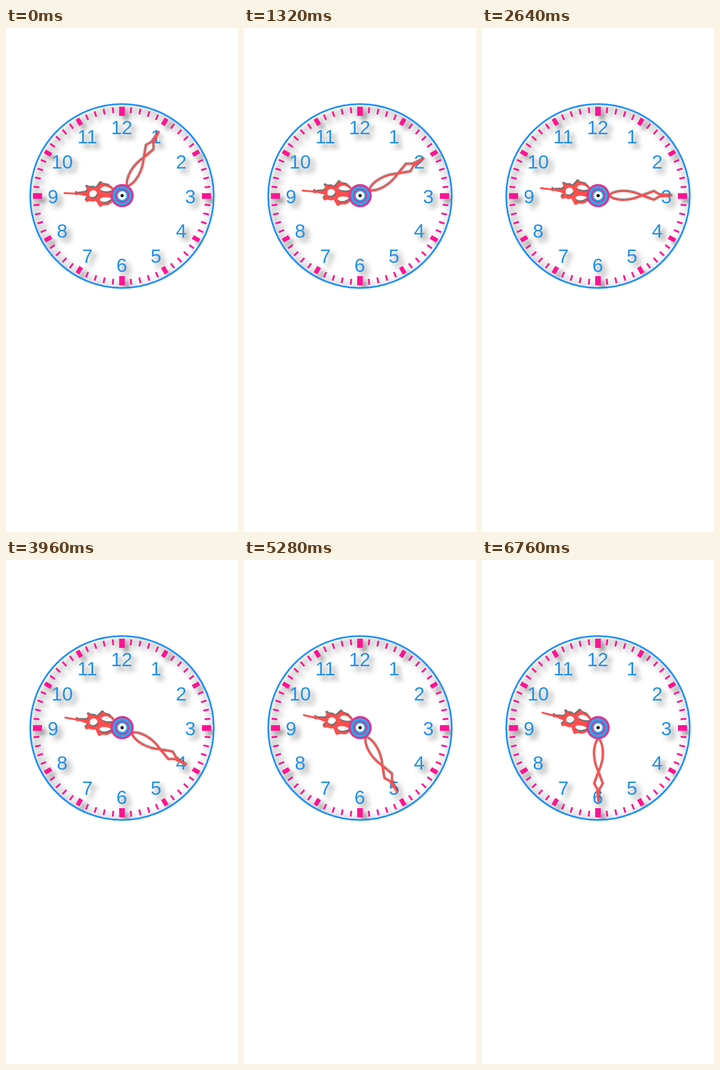
Animation of 508x1101 px, one loop 8.08 s. Source, as an HTML page:

```html
<!DOCTYPE html>
<html lang="en">
<head>
<meta charset="utf-8">
<title>Clock</title>
<style>
  html, body { margin: 0; width: 100%; height: 100%; overflow: hidden; background: #fff; }
  svg { display: block; width: 508px; height: 1101px; }
  text { font: 42px "Liberation Sans", Arial, sans-serif; fill: #2191ea; text-anchor: middle; }
  .tick { stroke: #ff1493; }
  .rim { fill: none; stroke: #1e90ff; stroke-width: 3.6; }
  .dial { filter: drop-shadow(9px 9px 6px rgba(0, 0, 0, .48)); }
  .hour { fill: #ff4d4d; fill-rule: evenodd; }
  .raised { filter: drop-shadow(-2px -2.5px .7px rgba(50, 50, 50, .7)); }
  .minute { fill: none; stroke: #ff4d4d; stroke-width: 4.1; stroke-linejoin: round;
            filter: drop-shadow(0 -1.6px .7px rgba(60, 60, 60, .5)); }
</style>
</head>
<body>
<svg viewBox="0 0 508 1101">
  <clipPath id="face"><circle r="202"/></clipPath>
  <g transform="translate(254 367)">
    <g clip-path="url(#face)">
      <g class="dial" id="dial"><circle class="rim" r="201"/></g>
    </g>
    <circle class="rim" r="201"/>
  </g>
  <g transform="translate(254.3 366.2)">
    <g id="hour">
      <path class="hour raised" id="body"/>
      <path class="hour" d="M-128 -2L-104 -2L-100 -3.5L-95 -2L-76 -4.5V4.5L-95 2L-100 3.5L-104 2L-128 2Z"/>
    </g>
    <g id="minute">
      <path class="minute" d="M23 0C36 -12 68 -14 96 0L122 9.5L134 2.5L161 0L134 -2.5L122 -9.5L96 0C68 14 36 12 23 0"/>
    </g>
    <g id="hub"></g>
  </g>
</svg>
<script>
const $ = id => document.getElementById(id);

function add(parent, tag, attrs, text = '') {
  const node = document.createElementNS('http://www.w3.org/2000/svg', tag);
  for (const key in attrs) node.setAttribute(key, attrs[key]);
  node.textContent = text;
  parent.append(node);
}

for (let i = 0; i < 60; i++) {
  const [inner, outer, width] = i % 15 === 0 ? [175, 195, 12.5] : i % 5 === 0 ? [179, 195, 9.5] : [182, 194.5, 4];
  add($('dial'), 'line', {
    class: 'tick', y1: -inner, y2: -outer, 'stroke-width': width, transform: `rotate(${i * 6})`
  });
}

for (let n = 1; n <= 12; n++) {
  const angle = n * Math.PI / 6;
  add($('dial'), 'text', { x: -.7 + 150.5 * Math.sin(angle), y: 15.5 - 150.5 * Math.cos(angle) }, n);
}

const rings = [[25.4, '#dd368f'], [20.5, '#10b2f8'], [15.8, '#dd368f'], [12.2, '#10b2f8'], [9.4, '#fff'], [3.4, '#000']];
for (const [r, fill] of rings) add($('hub'), 'circle', { r, fill });

// The hour hand's body is one half outline, mirrored; it points to nine at rest.
const edge = [[-102, -1], [-100, -3], [-96, -1], [-79, -4], [-76, -8], [-80, -15], [-77, -17.5],
  [-71, -15], [-63, -16], [-57, -14], [-52, -21], [-49, -26], [-45, -26.5], [-41, -23], [-30, -22], [-20, -15], [-12, -4]];
const mirror = points => points.map(([x, y]) => [x, -y]);
const outline = points => `M${points.join('L')}Z`;
const lens = side => `M-49 ${side * 11}C-43 ${side * 23} -29 ${side * 19} -20 ${side * 9}` +
  `C-28 ${side * 3} -46 ${side * 4} -49 ${side * 11}Z`;
const eye = 'M-72 0C-72 -6 -68 -9 -63 -9C-58 -9 -55 -5 -53 0C-55 5 -58 9 -63 9C-68 9 -72 6 -72 0Z';
$('body').setAttribute('d', outline([...edge, ...mirror(edge).reverse()]) + lens(-1) + lens(1) + eye);

const changes = [0, 1320, 2640, 3960, 5280, 6760];
const loop = 8080;

function draw() {
  const time = performance.now() % loop;
  const minutes = 5 * changes.filter(start => time >= start).length;
  $('hour').setAttribute('transform', `rotate(${minutes / 2})`);
  $('minute').setAttribute('transform', `rotate(${minutes * 6 - 90})`);
  requestAnimationFrame(draw);
}
draw();
</script>
</body>
</html>
```
